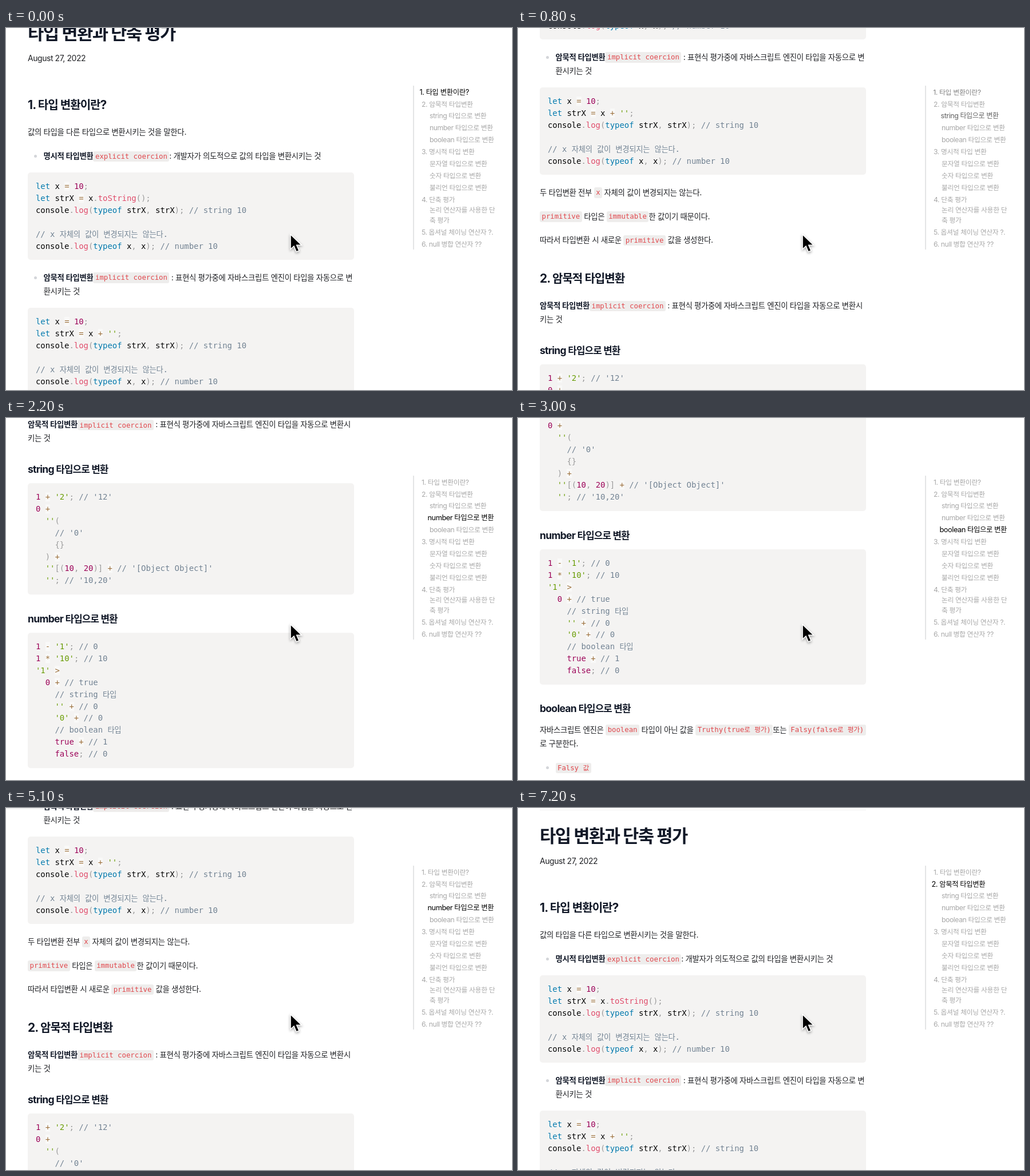
Animation, 884 px wide and 634 px high, one loop 8 s. Source, as an HTML page:

```html
<!DOCTYPE html>
<html lang="ko">
<head>
<meta charset="utf-8">
<style>
  html, body { margin: 0; width: 100%; height: 100%; overflow: hidden; background: #fff; }
  #stage { position: relative; width: 884px; height: 634px; overflow: hidden;
    font: 13.94px/24px Inter, "Noto Sans CJK KR", sans-serif; letter-spacing: -.03em; color: #1f2024; }
  #page { position: absolute; inset: 0; }
  .line, .box, .dot, .toc { position: absolute; white-space: pre; }
  .line { transform: translateY(-50%); }
  .k { font-family: "Noto Sans CJK KR", sans-serif; font-size: .96em; line-height: 0; letter-spacing: -.022em; }
  .h1, .h2, .h3 { font-weight: 700; color: #111827; letter-spacing: -.04em; }
  .h1 { font-size: 32px; font-weight: 800; }
  .h2 { font-size: 20.9px; }
  .h3 { font-size: 17.5px; }
  .h1 .k, .h2 .k, .h3 .k { letter-spacing: -.05em; }
  b { font-weight: 700; color: #111827; }
  code { font: 12.3px/0 "DejaVu Sans Mono", monospace; letter-spacing: 0; color: #e0474c;
    background: #eeedec; border-radius: 3px; padding: 2.4px 3.5px; }
  .dot { width: 5px; height: 5px; border-radius: 50%; background: #d3d5d9; }
  .box { left: 38px; width: 542.5px; padding: 13.94px; border-radius: 5px; background: #f4f3f2;
    font: 13.9px/20.92px "DejaVu Sans Mono", monospace; letter-spacing: 0; color: #000; text-shadow: 0 1px #fff; }
  .comment { color: #708090; } .string { color: #690; } .keyword { color: #07a; }
  .value { color: #905; } .call { color: #dd4a68; } .mark { color: #999; }
  .op { color: #9a6e3a; background: rgba(255, 255, 255, .5); }
  .toc { font-size: 12.2px; line-height: 17.6px; transform-origin: 78px 50%; }
  #rule { position: absolute; left: 711px; top: 101px; width: 1.5px; height: 287px; background: #e3e4e6; }
  #hr { position: absolute; left: 38px; top: 3px; width: 570px; height: 1px; background: #f0f0f1; }
  #header { position: absolute; left: 0; right: 0; top: -2px; height: 2px; box-shadow: 0 1px 3px rgba(0, 0, 0, .13); }
  #cursor { position: absolute; left: 0; top: 0; filter: drop-shadow(0 2px 2px rgba(0, 0, 0, .35)); }
</style>
</head>
<body>
<div id="stage">
  <div id="page"><div id="hr"></div></div>
  <div id="rule"></div>
  <div id="header"></div>
  <svg id="cursor" width="884" height="634">
    <path d="M497 361.5v26l6-5.5 4.2 10 4.8-2-4.2-9.8h8.6z" stroke="#fff" stroke-width="1.6"/>
  </svg>
</div>
<script>
const stage = document.getElementById('stage');
const page = document.getElementById('page');
const header = document.getElementById('header');

const hangul = html => html.replace(/[가-힣]+/g, '<span class="k">$&</span>');
const rich = text => hangul(text
  .replace(/`(.+?)`/g, '<code>$1</code>')
  .replace(/\*(.+?)\*/g, '<b>$1</b>'));

function add(parent, cls, x, y, html) {
  const el = document.createElement('div');
  el.className = cls;
  el.style.left = x + 'px';
  el.style.top = y + 'px';
  el.innerHTML = html;
  return parent.appendChild(el);
}

const line = (y, text, cls = '', x = 38) => add(page, 'line ' + cls, x, y, rich(text));

function bullet(y, text, x = 65.5) {
  add(page, 'dot', x - 17, y - 2, '');
  line(y, text, '', x);
}

const kinds = ['comment', 'string', 'keyword', 'value', 'call', 'op', 'mark'];
const tokens = /(\/\/.*)|('[^']*')|\b(let|typeof)\b|\b(true|false|\d+)\b|(\w+(?=\())|([=+*>-])|([.,;(){}[\]])/g;

function codeBox(y, source) {
  const html = source.replace(tokens, (text, ...groups) =>
    `<span class="${kinds[groups.findIndex(g => g !== undefined)]}">${text}</span>`);
  add(page, 'box', 38, y, hangul(html)).style.left = '';
}

const logs = `console.log(typeof strX, strX); // string 10

// x 자체의 값이 변경되지는 않는다.
console.log(typeof x, x); // number 10`;

line(49, '타입 변환과 단축 평가', 'h1');
line(93, 'August 27, 2022');
line(175, '1. 타입 변환이란?', 'h2');
line(222, '값의 타입을 다른 타입으로 변환시키는 것을 말한다.');
bullet(264, '*명시적 타입변환*`explicit coercion`: 개발자가 의도적으로 값의 타입을 변환시키는 것');
codeBox(293, `let x = 10;
let strX = x.toString();
${logs}`);
bullet(476.5, '*암묵적 타입변환*`implicit coercion` : 표현식 평가중에 자바스크립트 엔진이 타입을 자동으로 변');
line(501, '환시키는 것', '', 65.5);
codeBox(530, `let x = 10;
let strX = x + '';
${logs}`);
line(713.5, '두 타입변환 전부 `x` 자체의 값이 변경되지는 않는다.');
line(755.5, '`primitive` 타입은 `immutable`한 값이기 때문이다.');
line(797, '따라서 타입변환 시 새로운 `primitive` 값을 생성한다.');
line(865, '2. 암묵적 타입변환', 'h2');
line(912, '*암묵적 타입변환*`implicit coercion` : 표현식 평가중에 자바스크립트 엔진이 타입을 자동으로 변환시');
line(936, '키는 것');
line(990.5, 'string 타입으로 변환', 'h3');
codeBox(1015, `1 + '2'; // '12'
0 +
  ''(
    // '0'
    {}
  ) +
  ''[(10, 20)] + // '[Object Object]'
  ''; // '10,20'`);
line(1252.5, 'number 타입으로 변환', 'h3');
codeBox(1277, `1 - '1'; // 0
1 * '10'; // 10
'1' >
  0 + // true
    // string 타입
    '' + // 0
    '0' + // 0
    // boolean 타입
    true + // 1
    false; // 0`);
line(1556, 'boolean 타입으로 변환', 'h3');
line(1592.5, '자바스크립트 엔진은 `boolean` 타입이 아닌 값을 `Truthy(true로 평가)`또는 `Falsy(false로 평가)`');
line(1616.5, '로 구분한다.');
bullet(1659, '`Falsy 값`');
['false', 'undefined', 'null'].forEach((name, i) => bullet(1694 + i * 31.5, name, 93.5));

// Table of contents: top-level entries start with a number.
const toc = [
  [112.5, '1. 타입 변환이란?'], [133.3, '2. 암묵적 타입변환'], [154.2, 'string 타입으로 변환'],
  [175.2, 'number 타입으로 변환'], [196.2, 'boolean 타입으로 변환'], [217, '3. 명시적 타입 변환'],
  [238, '문자열 타입으로 변환'], [259, '숫자 타입으로 변환'], [280, '불리언 타입으로 변환'],
  [301, '4. 단축 평가'], [319.2, '논리 연산자를 사용한 단\n축 평가'],
  [357.5, '5. 옵셔널 체이닝 연산자 ?.'], [378.5, '6. null 병합 연산자 ??']
].map(([y, text]) => add(stage, 'toc', /^\d/.test(text) ? 726 : 740, y - 8.8, hangul(text)));

// [entry, becomes active, stops being active]
const active = [
  [0, -500, 660], [2, 710, 1440], [3, 1440, 2340], [4, 2340, 4500], [3, 4500, 5950], [1, 5950, 9000]
];

// [time, scroll offset]
const scroll = [
  [0, 40], [100, 62], [200, 84], [300, 95], [400, 100], [500, 100], [600, 160], [700, 335], [800, 426],
  [1000, 515], [1200, 572], [1400, 606], [1500, 635.5], [1700, 750], [2000, 860], [2300, 921],
  [2400, 950], [2600, 1003], [2800, 1035], [3000, 1047], [3400, 1047], [3700, 1041], [3900, 1041],
  [4300, 1124], [4400, 1080], [4500, 965], [4800, 725], [5000, 560], [5200, 400], [5400, 290],
  [5600, 240], [5700, 231.5], [5900, 231], [6000, 120], [6100, 5], [6400, 0], [8000, 0]
];

const clamp = v => Math.min(1, Math.max(0, v));
const ease = v => (v = clamp(v), v * v * (3 - 2 * v));

function scrollAt(t) {
  const i = scroll.findIndex(([time]) => time > t);
  const [t0, y0] = scroll[i - 1], [t1, y1] = scroll[i];
  return y0 + (y1 - y0) * (t - t0) / (t1 - t0);
}

function draw() {
  const t = Math.floor(performance.now() % 8000 / 100) * 100;
  page.style.transform = `translateY(${-scrollAt(t)}px)`;
  header.style.opacity = t >= 4500 && t < 6100 ? 1 : 0;
  toc.forEach((el, i) => {
    const level = active.filter(a => a[0] === i)
      .reduce((sum, [, on, off]) => sum + ease((t - on) / 200) - ease((t - off) / 200), 0);
    const grey = Math.round(168 * (1 - level));
    el.style.color = `rgb(${grey},${grey},${grey})`;
    el.style.transform = `scale(${1 + .045 * level})`;
  });
  requestAnimationFrame(draw);
}
draw();
</script>
</body>
</html>
```
